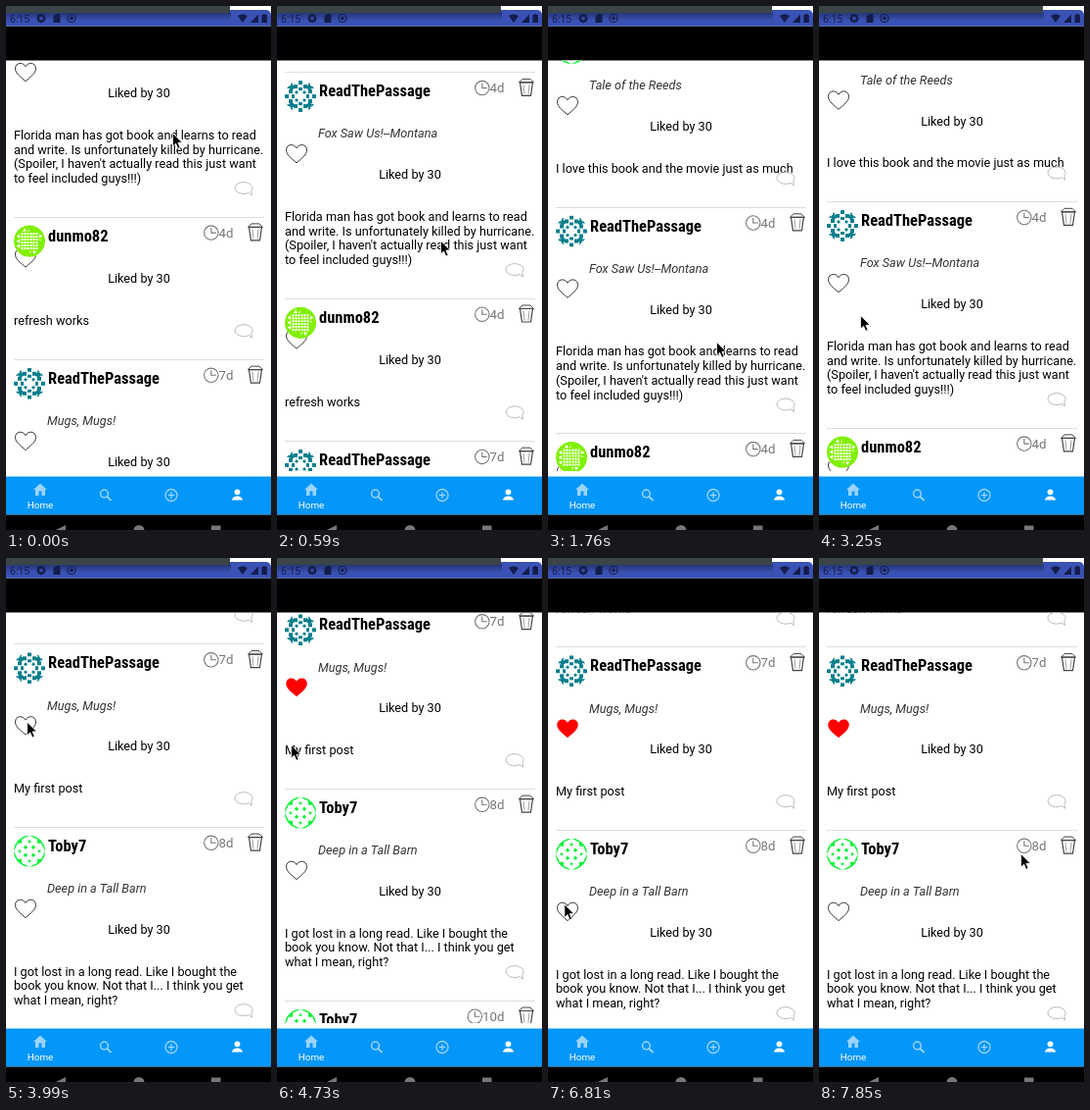
Recreate the animation shown at these times as an HTML page with a canvas. Size 271 px wide and 534 px high, loop 8000 ms.

```html
<!DOCTYPE html>
<html lang="en">
<head>
<meta charset="utf-8">
<title>Book feed</title>
<style>
html, body { margin: 0; width: 100%; height: 100%; overflow: hidden; background: #fff; }
canvas { display: block; width: 271px; height: 534px; }
</style>
</head>
<body>
<canvas id="stage"></canvas>
<script>
const W = 271, H = 534, LOOP = 8000, TICK = 148.1;
const canvas = document.getElementById('stage');
const ctx = canvas.getContext('2d');
const dpr = window.devicePixelRatio || 1;
canvas.width = W * dpr;
canvas.height = H * dpr;

const SANS = 'Roboto, sans-serif';
const BODY = '12.7px ' + SANS;
const NAME = 'bold condensed 16.5px "Roboto Condensed", ' + SANS;
const LINE = 14.7, TITLE = 41.3;

const posts = [
  { who: 'Toby7', look: 'green', age: '4d', title: 'Tale of the Reeds',
    text: ['I love this book and the movie just as much'] },
  { who: 'ReadThePassage', look: 'teal', age: '4d', title: 'Fox Saw Us!--Montana',
    text: ['Florida man has got book and learns to read', 'and write. Is unfortunately killed by hurricane.',
      "(Spoiler, I haven't actually read this just want", 'to feel included guys!!!)'] },
  { who: 'dunmo82', look: 'lime', age: '4d', text: ['refresh works'] },
  { who: 'ReadThePassage', look: 'teal', age: '7d', title: 'Mugs, Mugs!', likedAt: 30,
    text: ['My first post'] },
  { who: 'Toby7', look: 'green', age: '8d', title: 'Deep in a Tall Barn',
    text: ['I got lost in a long read. Like I bought the', 'book you know. Not that I... I think you get',
      'what I mean, right?'] },
  { who: 'Toby7', look: 'green', age: '10d', title: '', text: [''] }
];

// Eased progress of a move from tick a to tick b.
function ease(k, a, b) {
  const u = Math.max(0, Math.min(1, (k - a) / (b - a)));
  return u * u * (3 - 2 * u);
}

// Each move: first tick, last tick, distance.
function scrollAt(k) {
  const moves = [[0, 7, 137], [8, 12, 83.5], [12, 14, -5.5], [22, 28, -526.5], [33, 38, 42]];
  return moves.reduce((y, [a, b, by]) => y + by * ease(k, a, b), -202.5);
}

function pointerAt(k) {
  const moves = [[0, 7, -5, 181], [8, 12, 7, 32], [12, 17, -153, -54], [21, 22, 23, 27],
    [22, 29, -26, -185], [30, 32, -2, 60], [32, 39, 32, 15], [39, 47, -31, 154], [51, 53, 191, -58]];
  return moves.reduce(([x, y], [a, b, dx, dy]) => {
    const e = ease(k, a, b);
    return [x + dx * e, y + dy * e];
  }, [170, 129]);
}

function rect(x, y, w, h, color) {
  ctx.fillStyle = color;
  ctx.fillRect(x, y, w, h);
}

function paint(fill, stroke, width) {
  if (fill) { ctx.fillStyle = fill; ctx.fill(); }
  if (stroke) { ctx.strokeStyle = stroke; ctx.lineWidth = width; ctx.stroke(); }
}

function poly(points, fill, stroke, width = 1) {
  ctx.beginPath();
  points.forEach(([x, y]) => ctx.lineTo(x, y));
  ctx.closePath();
  paint(fill, stroke, width);
}

function line(x1, y1, x2, y2, color, width = 1) {
  ctx.beginPath();
  ctx.moveTo(x1, y1);
  ctx.lineTo(x2, y2);
  paint(null, color, width);
}

function disc(x, y, r, fill, stroke, width = 1) {
  ctx.beginPath();
  ctx.arc(x, y, r, 0, 7);
  paint(fill, stroke, width);
}

// Regular polygon with its first corner pointing up.
function ngon(n, x, y, r, fill) {
  const turn = i => i * 2 * Math.PI / n;
  poly(Array.from({ length: n }, (_, i) => [x + r * Math.sin(turn(i)), y - r * Math.cos(turn(i))]), fill);
}

function label(str, x, y, font, color = '#000', align = 'left') {
  ctx.font = font;
  ctx.fillStyle = color;
  ctx.textAlign = align;
  ctx.fillText(str, x, y);
}

function at(x, y, draw) {
  ctx.save();
  ctx.translate(x, y);
  draw();
  ctx.restore();
}

// One side of each avatar, drawn four times around the centre.
const side = {
  teal(c) {
    for (let i = -2; i < 3; i++) rect(i * 5 - 2, i % 2 ? -12 : -16, 4, 4, c);
    ngon(4, -9, -9, 3.5, c);
    rect(-2, -9, 4, 3, c);
    ngon(4, -4, -4, 2, c);
  },
  lime(c) {
    rect(-16.5, -16.5, 17, 17, c);
    for (let i = -1; i < 2; i++) ngon(3, i * 5, -11, 2.4, '#fff');
    for (let i = 0; i < 9; i++) rect(-8.5 + i % 3 * 3, -8.5 + Math.floor(i / 3) * 3, 2.1, 2.1, '#fff');
  },
  green(c) {
    poly([[-16, -8], [-8, -16], [-8, -8]], c);
    poly([[-8, -16], [0, -16], [-8, -12]], c);
    poly([[0, -16], [8, -16], [8, -12]], c);
    ngon(3, 0, -10, 2.2, c);
    ngon(4, -4, -4, 2.2, c);
  }
};
const tint = { teal: '#087f8c', lime: '#80f000', green: '#12f23c' };

function avatar(look, x, y) {
  at(x, y, () => {
    ctx.beginPath();
    ctx.arc(0, 0, 16, 0, 7);
    ctx.clip();
    rect(-16, -16, 32, 32, '#fff');
    for (let i = 0; i < 4; i++) {
      side[look](tint[look]);
      ctx.rotate(Math.PI / 2);
    }
  });
}

function heart(x, y, red) {
  at(x, y, () => {
    ctx.beginPath();
    for (const s of [-1, 1]) {
      ctx.moveTo(0, -5.5);
      ctx.bezierCurveTo(s * 2.5, -10.5, s * 10.5, -10, s * 10.5, -3.5);
      ctx.bezierCurveTo(s * 10.5, 1.5, s * 5, 5, 0, 9.5);
    }
    paint(red && '#f00', red ? '#f00' : '#333', red ? 0.5 : 1);
  });
}

function clock(x, y) {
  disc(x, y, 7.2, null, '#777', 1.1);
  line(x, y - 5, x, y + 0.5, '#777', 1.1);
  line(x, y, x + 5, y, '#777', 1.1);
}

function bin(x, y) {
  at(x, y, () => {
    poly([[-7.5, -5], [-4, -8.5], [4, -8.5], [7.5, -5]], null, '#444');
    poly([[-6.5, -5], [6.5, -5], [4.5, 8.5], [-4.5, 8.5]], null, '#444', 1.2);
    for (const s of [-1, 1]) line(s * 3, -3, s * 2, 7, '#888', 0.8);
  });
}

function bubble(x, y) {
  ctx.beginPath();
  ctx.ellipse(x, y - 0.5, 9, 6, 0, Math.PI * 0.3, Math.PI * 2.16);
  ctx.lineTo(x + 8.5, y + 7);
  ctx.closePath();
  paint(null, '#bbb', 1);
}

const shiftOf = p => p.title === undefined ? 0 : TITLE;
const heightOf = p => 145.2 + shiftOf(p) + (p.text.length - 1) * LINE;

function post(p, y, k) {
  const low = y + shiftOf(p);
  rect(8, Math.round(y), 256, 1, '#ddd');
  heart(20, low + 42, k >= p.likedAt);
  avatar(p.look, 24, y + 25);
  label(p.who, 43, y + 25, NAME);
  label(p.age, 232.5, y + 21, '13.3px ' + SANS, '#777', 'right');
  clock(232.5 - ctx.measureText(p.age).width - 7.7, y + 16.5);
  bin(255, y + 15.8);
  if (p.title) label(p.title, 42, y + 67.3, 'italic ' + BODY, '#333');
  label('Liked by 30', 136, low + 67.8, BODY, '#000', 'center');
  p.text.forEach((s, i) => label(s, 8, low + 110.6 + i * LINE, BODY));
  bubble(243, y + heightOf(p) - 28.6);
}

function feed(k) {
  ctx.save();
  ctx.beginPath();
  ctx.rect(0, 55.5, W, 418.5);
  ctx.clip();
  let y = scrollAt(k);
  for (const p of posts) {
    post(p, y, k);
    y += heightOf(p);
  }
  ctx.restore();
}

function statusBar() {
  const ink = '#141d4c';
  rect(0, 20.5, W, 35, '#000');
  ctx.beginPath();
  ctx.roundRect(0, 4, W, 16.5, [5, 5, 0, 0]);
  paint('#3a52b5');
  const shade = ctx.createLinearGradient(0, 6, 0, 15);
  shade.addColorStop(0, 'rgba(0,0,0,.4)');
  shade.addColorStop(1, 'rgba(0,0,0,0)');
  rect(0, 6, 230, 9, shade);
  rect(0, 0, 229, 7, '#3b4548');
  label('6:15', 4, 17, '10.5px ' + SANS, ink);
  disc(36, 12.5, 3, null, ink, 2);
  for (let i = 0; i < 8; i++) {
    const c = Math.cos(i * Math.PI / 4), s = Math.sin(i * Math.PI / 4);
    line(36 + 3 * c, 12.5 + 3 * s, 36 + 4.8 * c, 12.5 + 4.8 * s, ink, 1.6);
  }
  poly([[48.5, 10.5], [51, 8], [55.5, 8], [55.5, 17], [48.5, 17]], ink);
  disc(67, 12.5, 4, null, ink, 1.2);
  disc(67, 12.5, 1.8, ink);
  ctx.beginPath();
  ctx.moveTo(242, 17);
  ctx.arc(242, 17, 8.5, Math.PI * 1.3, Math.PI * 1.7);
  paint(ink);
  poly([[250, 17], [258, 17], [258, 8.5]], ink);
  rect(261.5, 9, 5.5, 8, ink);
  rect(263, 8, 2.5, 1, ink);
}

function navBar() {
  const pale = '#9bd4fd';
  rect(0, 479.5, W, 39, '#0496f8');
  poly([[28, 493], [35, 486.5], [42, 493]], pale);
  rect(30, 493, 10, 6, pale);
  rect(33.5, 494.5, 3, 4.5, '#0496f8');
  label('Home', 35, 512, '9.9px ' + SANS, '#fff', 'center');
  disc(100.5, 497, 3.9, null, pale, 1.5);
  line(103.3, 499.8, 107.5, 504, pale, 1.8);
  disc(169, 498.5, 6, null, pale, 1.3);
  line(165.7, 498.5, 172.3, 498.5, pale, 1.3);
  line(169, 495.2, 169, 501.8, pale, 1.3);
  disc(236.5, 495.3, 2.9, '#fff');
  ctx.beginPath();
  ctx.ellipse(236.5, 503.5, 5.5, 4, 0, Math.PI, 0);
  paint('#fff');
  rect(0, 518.5, W, 16, '#000');
  poly([[51, 534], [61, 529], [61, 539]], '#777');
  disc(136, 534.5, 5.5, '#777');
  rect(210, 529.5, 9.5, 9, '#777');
}

function pointer(k) {
  at(...pointerAt(k), () => poly([[0.5, 0.5], [0.5, 14], [3.6, 11.2], [5.8, 16.3], [8.1, 15.3],
    [5.9, 10.3], [10.2, 10.1]], '#000', '#fff', 0.8));
}

function frame(now) {
  const k = Math.min(53, Math.floor((now % LOOP + 20) / TICK));
  ctx.setTransform(dpr, 0, 0, dpr, 0, 0);
  rect(0, 0, W, H, '#fff');
  statusBar();
  feed(k);
  navBar();
  pointer(k);
}

const start = performance.now();
function run(now) {
  frame(Math.max(0, now - start));
  requestAnimationFrame(run);
}
frame(0);
requestAnimationFrame(run);
</script>
</body>
</html>
```
